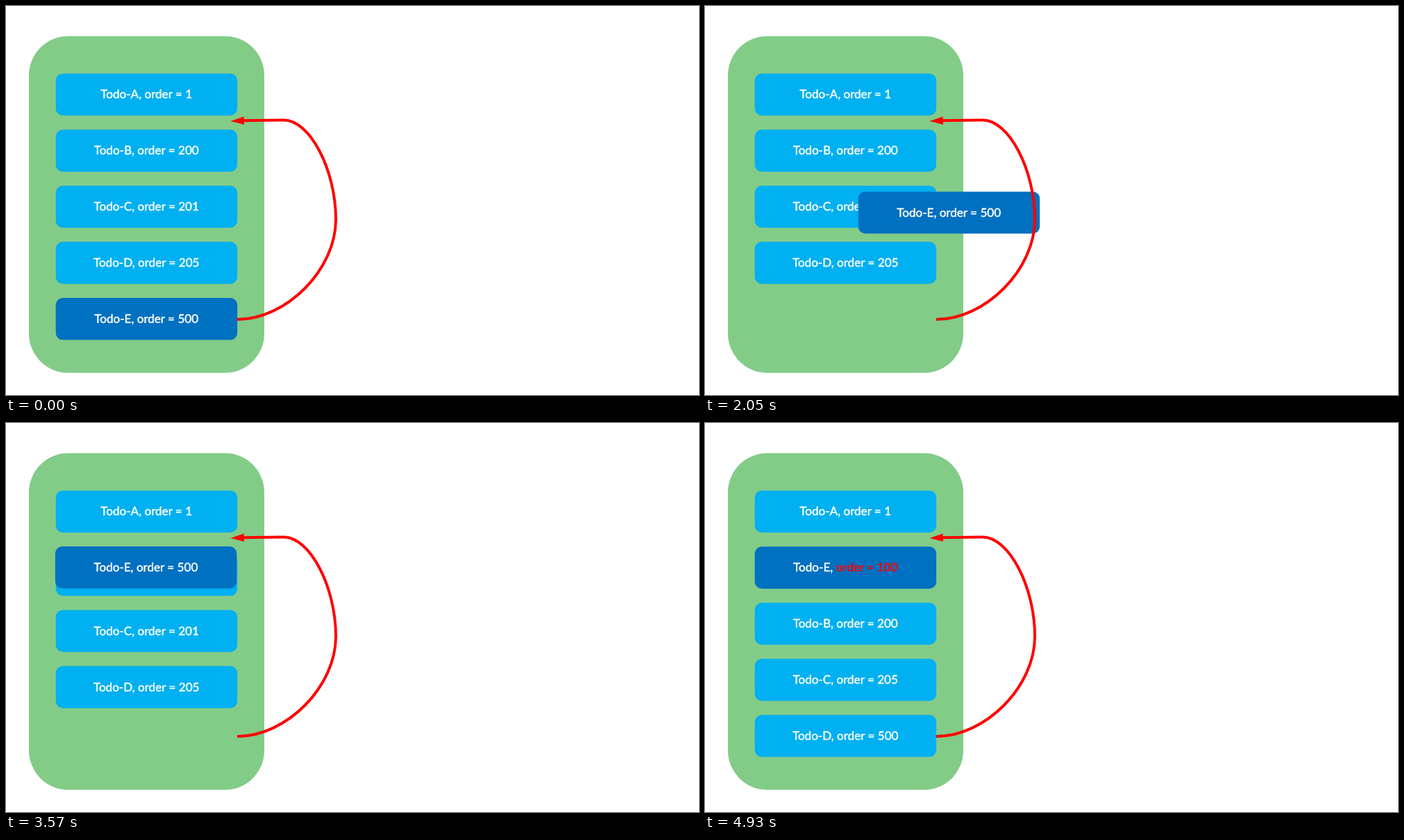
Animation of 998 by 561 pixels, one loop 7.03 s. Source, as an HTML page:

```html
<!DOCTYPE html>
<html lang="en">
<head>
<meta charset="utf-8">
<title>Reordering a list</title>
<style>
  html, body { margin: 0; width: 100%; height: 100%; overflow: hidden; background: #fff; }
  svg { display: block; width: 100%; height: 100%; }
  text {
    font: 17.1px Lato, Carlito, sans-serif; text-anchor: middle; text-rendering: geometricPrecision;
    fill: #fff; stroke: #fff; stroke-width: 0.45px;
  }
  .changed { fill: #f00; stroke: none; font-weight: 700; }
</style>
</head>
<body>
<svg viewBox="0 0 998 561">
  <rect x="33" y="43.5" width="339" height="485.5" rx="56.5" fill="#82cc88"/>
  <g id="cards"></g>
  <path d="M333 452C404 452 475 380 475 308S437.5 164.5 400 164.5L340 165.3" fill="none" stroke="#f00" stroke-width="4"/>
  <path d="M323.5 166L342.5 159.5L343 171Z" fill="#f00"/>
</svg>
<script>
const LOOP = 7030, STEP = 40;
const DRAG_START = 1050, DRAG_STEPS = 48;
const SHIFT_START = 3090, RENUMBER = 4930;
const LEFT = 71.7, TOP = 97.4, WIDTH = 261.4, HEIGHT = 60.6, PITCH = 80.9;

const layer = document.getElementById('cards');
const svgElement = name => document.createElementNS('http://www.w3.org/2000/svg', name);

// Offsets of the dragged card: out along the arrow, back over the gap, a small hook to settle
const dragPath = svgElement('path');
dragPath.setAttribute('d',
  'M0 0C75 0 149 -75 149 -155C149 -205 90 -220 39 -233C22 -237.5 -6 -254 -7 -247L-0.8 -243');
const dragLength = dragPath.getTotalLength();

function makeCard(letter, slot, fill) {
  const g = svgElement('g');
  g.innerHTML = `<rect x="${LEFT}" y="${TOP}" width="${WIDTH}" height="${HEIGHT}" rx="10" fill="${fill}"/>` +
    `<text x="202.2" y="133.4">Todo-${letter}, <tspan></tspan></text>`;
  layer.append(g);
  return { g, slot, order: g.querySelector('tspan') };
}

const cards = [...'ABCDE'].map((letter, i) => makeCard(letter, i, letter === 'E' ? '#0070c0' : '#00b0f0'));
const dragged = cards[4];

const moveCard = (card, dx, dy) =>
  card.g.setAttribute('transform', `translate(${dx} ${card.slot * PITCH + dy})`);

const clamp = p => Math.min(1, Math.max(0, p));
const stepsSince = (t, start) => t < start ? 0 : Math.floor((t - start) / STEP) + 1;
const easeInOut = p => p < 0.5 ? 2 * p * p : 1 - 2 * (1 - p) ** 2;

// Timing curve like CSS cubic-bezier(), solved by bisection
function cubicBezier(x1, y1, x2, y2) {
  const at = (u, a, b) => 3 * u * (1 - u) ** 2 * a + 3 * u * u * (1 - u) * b + u ** 3;
  return x => {
    let low = 0, high = 1;
    for (let i = 0; i < 20; i++) {
      const mid = (low + high) / 2;
      if (at(mid, x1, x2) < x) low = mid; else high = mid;
    }
    return at(high, y1, y2);
  };
}
const dragEase = cubicBezier(0.52, 0.07, 0.58, 1);

let renumbered;
function setOrders(done) {
  if (done === renumbered) return;
  renumbered = done;
  const values = done ? [1, 200, 205, 500, 100] : [1, 200, 201, 205, 500];
  cards.forEach((card, i) => { card.order.textContent = `order = ${values[i]}`; });
  dragged.order.classList.toggle('changed', done);
}

function draw(now) {
  const t = now % LOOP;
  const done = t >= RENUMBER;
  setOrders(done);

  const shift = PITCH * (done ? 1 : easeInOut(clamp((stepsSince(t, SHIFT_START) - 1.7) / 44.5)));
  cards.slice(0, 4).forEach((card, i) => moveCard(card, 0, i ? shift : 0));

  const progress = dragEase(clamp(stepsSince(t, DRAG_START) / DRAG_STEPS));
  const { x, y } = dragPath.getPointAtLength(progress * dragLength);
  if (done) moveCard(dragged, 0, -3 * PITCH);
  else moveCard(dragged, x, y);
}

function tick() {
  draw(performance.now());
  requestAnimationFrame(tick);
}
tick();
</script>
</body>
</html>
```
